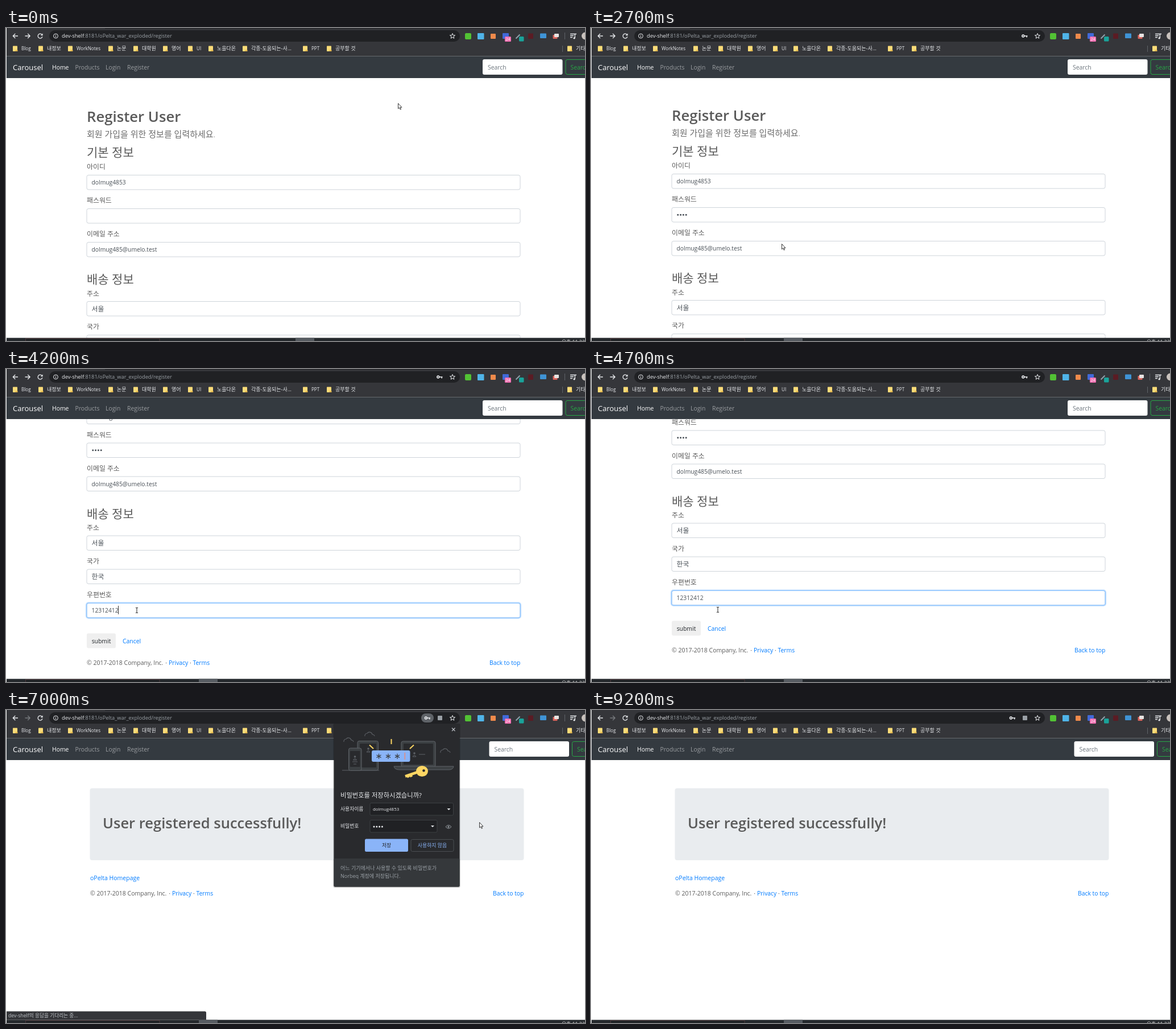
An HTML page that plays this animation: 1018x550 px, repeating every 9.4 s.

```html
<!DOCTYPE html>
<html lang="ko">
<head>
<meta charset="utf-8">
<title>Register form</title>
<style>
html, body { margin: 0; width: 100%; height: 100%; overflow: hidden; background: #fff; }
svg { display: block; width: 1018px; height: 550px; }
text { font-family: "Open Sans", "Noto Sans CJK KR", "Noto Sans CJK", sans-serif; white-space: pre; }
</style>
</head>
<body>
<svg id="stage" viewBox="0 0 1018 550" xmlns="http://www.w3.org/2000/svg"></svg>
<script>
const LOOP = 9400, STEP = 100;
const USER = 'dolmug4853', MAIL = 'dolmug485@umelo.test', HOST = 'dev-shelf', SHOP = 'oPelta';
const GREY = '#5a5a5a', LINK = '#007bff', LIGHT = '#e8eaed';

const text = (x, y, s, size, fill, extra = '') =>
  `<text x="${x}" y="${y}" font-size="${size}" fill="${fill}" ${extra}>${s}</text>`;
const rect = (x, y, w, h, fill, r = 0, extra = '') =>
  `<rect x="${x}" y="${y}" width="${w}" height="${h}" rx="${r}" fill="${fill}" ${extra}/>`;
const path = (d, stroke, width = 1.3, extra = '') =>
  `<path d="${d}" fill="none" stroke="${stroke}" stroke-width="${width}" ${extra}/>`;
const circle = (x, y, r, fill, extra = '') =>
  `<circle cx="${x}" cy="${y}" r="${r}" fill="${fill}" ${extra}/>`;
const group = (id, body, extra = '') => `<g id="${id}" ${extra}>${body}</g>`;
const dots = (x, y, gap, fill, id) =>
  [0, 1, 2, 3].map(i => circle(x + gap * i, y, 1.5, fill, id ? `id="${id}${i}"` : '')).join('');

const label = (y, s) => text(142, y + 4.4, s, 11.9, GREY);
const field = (y, s) =>
  rect(142, y + .5, 762, 25.5, '#fff', 3, 'stroke="#ced4da"') + text(150.5, y + 17.2, s, 10.3, '#495057');
const koField = (y, s) => field(y, '') + text(150.5, y + 17.6, s, 11.9, '#495057');
const footer = (x, y) =>
  text(x, y, '© 2017-2018 Company, Inc.', 10.5, GREY) + text(x + 138.3, y, '·', 10.4, GREY) +
  text(x + 144, y, 'Privacy', 10.4, LINK) + text(x + 181, y, '·', 10.4, GREY) +
  text(x + 186.5, y, 'Terms', 10.4, LINK) +
  text(x + 762.5, y, 'Back to top', 10.4, LINK, 'text-anchor="end"');

function registerPage() {
  return text(142, 163, 'Register User', 25.7, GREY, 'font-weight="600"') +
    text(142, 189.5, '회원 가입을 위한 정보를 입력하세요.', 15, '#6c6c6c', 'font-weight="300"') +
    text(142, 224, '기본 정보', 21, GREY) +
    label(242, '아이디') + field(256, USER) +
    label(301, '패스워드') + field(315, '') +
    label(360, '이메일 주소') + field(374, MAIL) +
    text(142, 447, '배송 정보', 21, GREY) +
    label(464.5, '주소') + koField(478, '서울') +
    label(523, '국가') + koField(537, '한국') +
    label(582.5, '우편번호') + field(596.5, '12312412') +
    rect(142, 650, 51, 26, '#efefef', 3) +
    text(167.5, 667.3, 'submit', 10.4, '#212529', 'text-anchor="middle"') +
    text(205, 667.3, 'Cancel', 10.4, LINK) + footer(142, 705.7) +
    group('ring', rect(141, -.5, 764, 27.5, 'none', 4, 'stroke="#bfdeff" stroke-width="2.2"') +
      rect(142, .5, 762, 25.5, 'none', 3, 'stroke="#80bdff"')) +
    dots(152.8, 328.3, 4.8, '#495057', 'dot') +
    rect(0, 0, 1, 15, '#333', 0, 'id="caret"');
}

function donePage() {
  return rect(147.5, 137.5, 763, 126.5, '#e9ecef', 4) +
    text(170, 208, 'User registered successfully!', 25.55, GREY, 'font-weight="600"') +
    text(148, 298.5, SHOP + ' Homepage', 10.5, LINK) + footer(148, 326);
}

function bookmarks() {
  const items = [[12, 'Blog'], [57, '내정보'], [109, 'WorkNotes'], [180, '논문'], [224, '대학원'],
    [276, '영어'], [320, 'UI'], [356, '노을다온'], [416, '각종-도움되는-사...'], [522, 'PPT'],
    [564, '공부할 것'], [987, '기타 북마크']];
  return items.map(([x, s]) =>
    rect(x, 31.5, 8, 9.5, '#fcdc78', .8) + rect(x + 4.5, 38.5, 4, 2.5, '#e3b84e', .5) +
    text(x + 15, 39, s, /[가-힣]/.test(s) ? 9 : 8.1, LIGHT)).join('') +
    path('M978.5 31V42', '#5f6368', 1);
}

function extensions() {
  return rect(807, 9, 11, 11, '#52c234', 2) +
    rect(829, 9, 11.5, 11, '#4fb4e8', 1) +
    rect(852, 10, 9, 9, '#f08a4b', 1) +
    rect(873, 9, 11, 10, '#4169d8', 1) + rect(877, 15, 11, 9, '#f26fb2', 1.5) +
    text(882.5, 22.3, '24', 7, '#fff', 'text-anchor="middle"') +
    path('M896.5 18.5L903.5 11.5', '#8fa3ad', 2) + rect(902, 15, 8.5, 8.5, '#1aa39a', 1.5) +
    rect(918, 9.5, 9, 9.5, '#5a1c24', 1) +
    rect(939, 9.5, 11, 8.5, '#3f94d6', 1) +
    rect(961.5, 12, 8, 7, '#d9645c', 1) + rect(964, 10, 8, 6, '#e8e4e2', 1) +
    path('M982.5 8V20', '#5f6368', 1) +
    path('M992 10.5H1000M992 13.5H998M992 16.5H996M1000.3 18V10.5H1003', LIGHT) +
    circle(999, 17.8, 1.6, LIGHT) + circle(1018.5, 14, 6.5, '#c9c2bd');
}

function browser() {
  const star = Array.from({ length: 10 }, (_, i) => {
    const r = i % 2 ? 2 : 4.8, a = i * Math.PI / 5 - Math.PI / 2;
    return `${(785 + r * Math.cos(a)).toFixed(1)},${(14.3 + r * Math.sin(a)).toFixed(1)}`;
  }).join(' ');
  return rect(1, 0, 1017, 49.5, '#35363a') + rect(174, 0, 844, 1, '#202124') +
    rect(76, 4, 722, 20, '#202124', 10) +
    path('M21 14H12.5M16.3 10L12.3 14L16.3 18', LIGHT) +
    path('M33.5 14H42M38.2 10L42.2 14L38.2 18', LIGHT, 1.3, 'id="forward"') +
    group('reload', path('M63.6 12A4 4 0 1 0 64 15.2', LIGHT) + `<path d="M64.6 9.5V13.3H60.8z" fill="${LIGHT}"/>`) +
    path('M56.5 10.5L63.5 17.5M63.5 10.5L56.5 17.5', LIGHT, 1.4, 'id="stop"') +
    circle(87.5, 14, 3.9, 'none', `stroke="${LIGHT}"`) + path('M87.5 13.5V16.2M87.5 11.7V12.7', LIGHT, 1) +
    `<text x="98" y="17.3" font-size="9.25" fill="#9aa0a6"><tspan fill="${LIGHT}">${HOST}</tspan>:8181/${SHOP}_war_exploded/register</text>` +
    rect(730, 6, 22, 16, '#5f6368', 8, 'id="glow"') +
    group('key', circle(-2.7, 0, 1.9, 'none', `stroke="${LIGHT}" stroke-width="1.6"`) +
      path('M-.8 0H5M3.6 0V2.4', LIGHT, 1.6)) +
    rect(759, 10, 8, 8, '#9aa0a6', 1, 'id="translate"') +
    `<polygon points="${star}" fill="none" stroke="${LIGHT}"/>` + extensions() + bookmarks();
}

function navbar() {
  return rect(1, 49.5, 1017, 38.5, '#343a40') +
    text(12, 74.3, 'Carousel', 13, '#fff') + text(81, 73.2, 'Home', 10.4, '#fff') +
    [[121.5, 'Products'], [175, 'Login'], [213, 'Register']].map(([x, s]) => text(x, 73.2, s, 10.4, '#9a9da0')).join('') +
    group('search', rect(838, 55, 140.5, 27, '#fff', 3) +
      text(847, 73.2, 'Search', 10.4, '#6c757d') +
      rect(984, 55.5, 52, 26, 'none', 3, 'stroke="#28a745"') + text(992.5, 73.2, 'Search', 10.4, '#28a745'));
}

function taskbar() {
  return rect(1, 544.5, 1017, 5.5, '#24282c') + rect(34.5, 545.5, 235.5, 8, '#202326', 0, 'stroke="#4b3639"') +
    rect(0, 544.5, 33, 5.5, '#565b61', 0, 'id="task"') + text(977, 554.5, '오후 11:22', 8.8, '#ddd');
}

function art() {
  const line = '#5f6368', body = '#3c4043', box = `stroke="${line}"`;
  const cloud = (x, y) => path(`M${x - 8} ${y + 3}a4 4 0 0 1 4 -5a5 5 0 0 1 9 2a3.5 3.5 0 0 1 4 3`, line, 1.1);
  const person = (x, y) => circle(x, y, 1.8, line) + path(`M${x - 3} ${y + 6}q3 -5 6 0z`, line, 1);
  const asterisk = x => [0, 60, 120].map(a =>
    path('M-4.6 0H4.6', '#3c4043', 1.3, `transform="translate(${x} 81.3) rotate(${a + 30})"`)).join('');
  return cloud(602, 53) + cloud(639, 43) + cloud(772, 72) + path('M591 106H656', line, 1) +
    rect(618, 54.5, 36.5, 51.5, body, 3, box) + rect(622, 59, 29, 42, '#292a2d', 1) + person(637, 68) +
    rect(602.5, 67, 22.5, 39.5, body, 3, box) + rect(605, 72, 17.5, 28, '#292a2d', 1) + person(613.5, 82) +
    path('M609 91H618M611 95H616', line, 1) +
    rect(695, 55, 60, 45, body, 3, box) + rect(699, 59, 52, 37, '#292a2d', 1) + person(718, 76) +
    path('M726 78H737', line, 1) + `<path d="M682 99H787Q786 105 779 105H692Q683 105 682 99z" fill="${body}" ${box}/>` +
    rect(643, 71, 67.5, 20, '#8ab4f8', 3) + asterisk(655.5) + asterisk(672) + asterisk(688) +
    path('M701.3 75V87', '#e98a78', 1.5) +
    path('M677.5 51V60M639 61.5L646 68M717 61.5L710 68', '#fdd663', 2) +
    path('M727 108L702 116.5M711 113.5L713 117.5M706 115L708 118.5', '#fdd663', 4.5) +
    `<ellipse cx="731.5" cy="107.5" rx="10.5" ry="9.5" fill="#fdd663"/>` + circle(734.5, 106.5, 2.3, '#292a2d');
}

function popup() {
  const tri = (x, y) => `<path d="M${x - 3} ${y - 1.5}h6l-3 3z" fill="${LIGHT}"/>`;
  const edge = 'stroke="#3c4043"';
  return rect(575.5, 24, 223, 288, '#000', 2, 'opacity=".25"') + rect(576.5, 24, 221, 286.5, '#292a2d', 2) +
    rect(576.5, 261, 221, 49.5, '#35383b', 2) + path('M784 31.5L789.5 37M789.5 31.5L784 37', '#bdc1c6', 1.2) + art() +
    text(588, 154, '비밀번호를 저장하시겠습니까?', 11.3, LIGHT) +
    text(588, 177.3, '사용자이름', 8.8, LIGHT) + text(588, 207.3, '비밀번호', 8.8, LIGHT) +
    rect(640, 163.5, 146.5, 21.5, '#202124', 2, edge) + text(645, 177, USER, 7.9, LIGHT, 'font-weight="500"') + tri(778.5, 174.5) +
    rect(640, 193.5, 118, 21.5, '#202124', 2, edge) + dots(647, 205, 4.8, LIGHT) + tri(750, 204.5) +
    path('M773 205.3Q778 199.5 783 205.3Q778 211 773 205.3z', '#9aa0a6', 1) + circle(778, 205.3, 1.4, '#9aa0a6') +
    rect(631, 226.5, 76, 22.5, '#8ab4f8', 2.5) + text(669, 241.3, '저장', 8.8, '#202124', 'text-anchor="middle"') +
    rect(712, 227.5, 75, 21, 'none', 2.5, 'stroke="#4a4e52"') +
    text(749.5, 241.3, '사용하지 않음', 8.9, '#8ab4f8', 'text-anchor="middle"') +
    text(588, 281.3, '어느 기기에서나 사용할 수 있도록 비밀번호가', 9, '#9aa0a6') +
    text(588, 295.3, 'Norbeq 계정에 저장됩니다.', 9, '#9aa0a6');
}

const stage = document.getElementById('stage');
stage.innerHTML =
  '<defs><clipPath id="view"><rect x="1" y="88" width="1017" height="457"/></clipPath></defs>' +
  rect(0, 0, 1018, 550, '#fff') +
  `<g clip-path="url(#view)">${group('form', registerPage())}${group('done', donePage())}</g>` +
  browser() + navbar() + taskbar() +
  group('status', `<path d="M1 529.5H349.5Q352 529.5 352 532V544.5H1z" fill="#35363a"/>` +
    text(4, 540.3, HOST + '의 응답을 기다리는 중...', 8.7, '#bdc1c6')) +
  group('popup', popup()) +
  group('arrow', '<path d="M.5 .5V9.8L2.6 7.9L4.2 11.3L5.6 10.6L4.1 7.4H6.9z" fill="#fff" stroke="#222" stroke-width=".9"/>') +
  group('beam', path('M-2 -4.5H-.8L0 -4L.8 -4.5H2M0 -4V4M-2 4.5H-.8L0 4L.8 4.5H2', '#222', 1));

const el = {};
stage.querySelectorAll('[id]').forEach(n => el[n.id] = n);
const show = (id, on) => el[id].setAttribute('visibility', on ? 'visible' : 'hidden');
const move = (id, x, y) => el[id].setAttribute('transform', `translate(${x} ${y})`);
const within = (t, a, b) => t >= a && t < b;

// Eased interpolation over rows of [time, ...values].
function track(rows, t) {
  const i = rows.findIndex(r => r[0] > t);
  if (i === 0) return rows[0].slice(1);
  if (i < 0) return rows[rows.length - 1].slice(1);
  const a = rows[i - 1], b = rows[i], p = (t - a[0]) / (b[0] - a[0]), e = p * p * (3 - 2 * p);
  return a.slice(1).map((v, k) => v + (b[k + 1] - v) * e);
}

const POINTER = [[0, 689, 132], [400, 998, 27], [800, 258, 321], [1400, 258, 321], [2300, 320, 390],
  [2700, 335, 379], [3000, 335, 379], [3400, 236, 366], [3500, 240, 400], [4100, 230, 424], [4500, 230, 424],
  [4700, 223, 423], [5500, 223, 423], [5700, 185, 455], [5900, 185, 455], [6300, 219, 424],
  [6500, 219, 424], [7000, 832, 197], [7800, 895, 170], [8300, 930, 110], [8600, 785, 31]];
const SCROLL = [[0, -2], [1000, -2], [1100, 0], [2700, 0], [3300, 185.5], [4400, 185.5], [4600, 207.5]];

function caretAt(t, typed) {
  if (within(t, 1400, 2300)) return Math.floor((t - 1400) / 500) % 2 ? null : [151 + typed * 4.8, 321];
  if (within(t, 3400, 3900)) return [172.5, 542.5];
  if (within(t, 4100, 4600) || within(t, 4800, 5300)) return [197, 601.5];
  return null;
}

function draw(t) {
  const done = t >= 5900;
  const [x, y] = track(POINTER, t);
  const beam = within(t, 700, 2300) || within(t, 3400, 5600);
  const typed = Math.max(0, Math.min(4, Math.floor((t - 1300) / 200)));
  const ringY = within(t, 1400, 2400) ? 315 : within(t, 3400, 4100) ? 537 : within(t, 4100, 5600) ? 596.5 : null;
  const caret = done ? null : caretAt(t, typed);
  const loading = within(t, 5600, 6900);

  el.form.style.display = done ? 'none' : '';
  el.done.style.display = done ? '' : 'none';
  move('form', 0, -track(SCROLL, t)[0]);
  show('ring', ringY !== null);
  move('ring', 0, ringY || 0);
  for (let i = 0; i < 4; i++) show('dot' + i, i < typed);
  show('caret', caret);
  if (caret) move('caret', caret[0], caret[1]);

  move('search', done ? 11.5 : 0, 0);
  el.forward.setAttribute('stroke', done ? '#777a7e' : LIGHT);
  show('reload', !loading);
  show('stop', loading);
  show('key', typed > 0);
  move('key', done ? 741 : 762.5, 14);
  show('translate', done);
  show('glow', within(t, 6900, 9000));
  move('task', t < 1100 ? 509 : 339, 0);
  show('status', within(t, 5900, 7300));
  show('popup', within(t, 6900, 8700));
  show('arrow', !beam && t < 8800);
  show('beam', beam);
  move(beam ? 'beam' : 'arrow', x, y);
}

const start = performance.now();
function tick() {
  const t = (performance.now() - start) % LOOP;
  draw(Math.floor(t / STEP) * STEP);
  requestAnimationFrame(tick);
}
tick();
</script>
</body>
</html>
```
